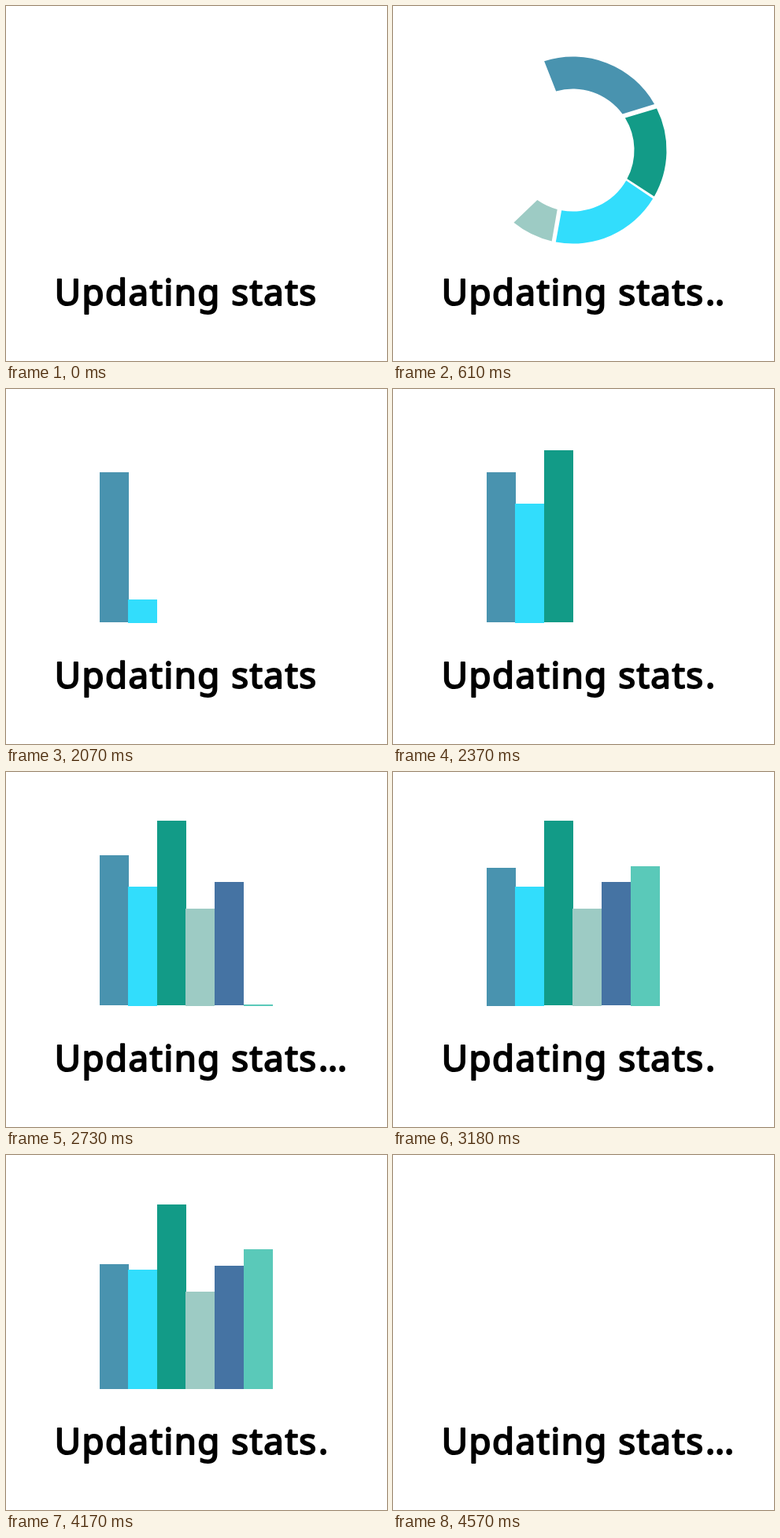
Recreate the animation shown at these times as an HTML page with a canvas. Size 484 by 452 pixels, loop 4.74 s.

```html
<!DOCTYPE html>
<html lang="en">
<head>
<meta charset="utf-8">
<title>Updating stats</title>
<style>
  html, body { margin: 0; width: 100%; height: 100%; overflow: hidden; background: #fff; }
  canvas { display: block; }
</style>
</head>
<body>
<canvas width="484" height="452"></canvas>
<script>
const ctx = document.querySelector('canvas').getContext('2d');
const LOOP = 4740;
const [steel, green, cyan, sage, blue, mint] =
  ['#4993af', '#129b87', '#32ddfc', '#9dcbc4', '#4573a3', '#5ac9b9'];

// Angles are clockwise degrees from the top; the cuts are not quite radial.
const slices = [
  { color: steel, outer: [-17.8, 60.5], inner: [-15.9, 53.9], on: 70, off: 1790 },
  { color: green, outer: [63.5, 119.7], inner: [58.3, 118], on: 240, off: 1690 },
  { color: cyan, outer: [121.3, 190.5], inner: [119.8, 190.6], on: 440, off: 1590 },
  { color: sage, outer: [193, 219.1], inner: [194.7, 215.4], on: 610, off: 1520 },
  { color: blue, outer: [220.5, 270], inner: [217.5, 271.5], on: 780, off: 1450 },
  { color: mint, outer: [271.5, 336.2], inner: [273.5, 338.5], on: 950, off: 1380 }
];
const bars = [[steel, 191], [cyan, 152], [green, 235], [sage, 124], [blue, 157], [mint, 178]];

// Each of these moments adds a dot; the fourth one clears them.
const dotTimes = [150, 510, 850, 1050, 1310, 1590, 1890, 1950, 2190, 2430,
  2670, 2910, 3150, 3390, 3630, 3870, 4110, 4350, 4570];

const rad = deg => (deg - 90) * Math.PI / 180;
const progress = (t, start, length) => Math.min(1, Math.max(0, (t - start) / length));

function drawSlice({ color, outer, inner }) {
  ctx.fillStyle = color;
  ctx.beginPath();
  ctx.arc(228.5, 183.5, 119, rad(outer[0]), rad(outer[1]));
  ctx.arc(228.5, 183.5, 78, rad(inner[1]), rad(inner[0]), true);
  ctx.fill();
}

function drawBar([color, full], i, t) {
  const rise = 1863 + 173 * i, dip = 3014 + 173 * i, leave = 4158 + 72 * i;
  if (t < rise || t >= leave + 72) return;
  const scale = progress(t, rise, 173)
    * Math.abs(1 - 2 * progress(t, dip, 173))
    * (1 - progress(t, leave, 72));
  const height = Math.max(1, Math.round(full * scale));
  const base = i % 2 || t >= dip ? 298 : 297;
  ctx.fillStyle = color;
  ctx.fillRect(Math.floor(119 + 36.6 * i), base - height, 37, height);
}

function drawText(text, x, spacing) {
  ctx.letterSpacing = spacing + 'px';
  ctx.fillText(text, x, 381);
  ctx.strokeText(text, x, 381);
}

function draw(t) {
  ctx.fillStyle = '#fff';
  ctx.fillRect(0, 0, 484, 452);
  slices.filter(s => t >= s.on && t < s.off).forEach(drawSlice);
  const tick = Math.floor(t / 30) * 30;
  if (t < 4570) bars.forEach((bar, i) => drawBar(bar, i, tick));

  ctx.fillStyle = ctx.strokeStyle = '#000';
  ctx.font = '45.5px "Noto Sans", sans-serif';
  ctx.lineWidth = 2;
  ctx.lineJoin = 'round';
  drawText('Updating stats', 61.8, 1.5);
  drawText('.'.repeat(dotTimes.filter(d => t >= d).length % 4), 397, -0.2);
}

const start = performance.now();
function frame() {
  draw((performance.now() - start) % LOOP);
  requestAnimationFrame(frame);
}
frame();
</script>
</body>
</html>
```
